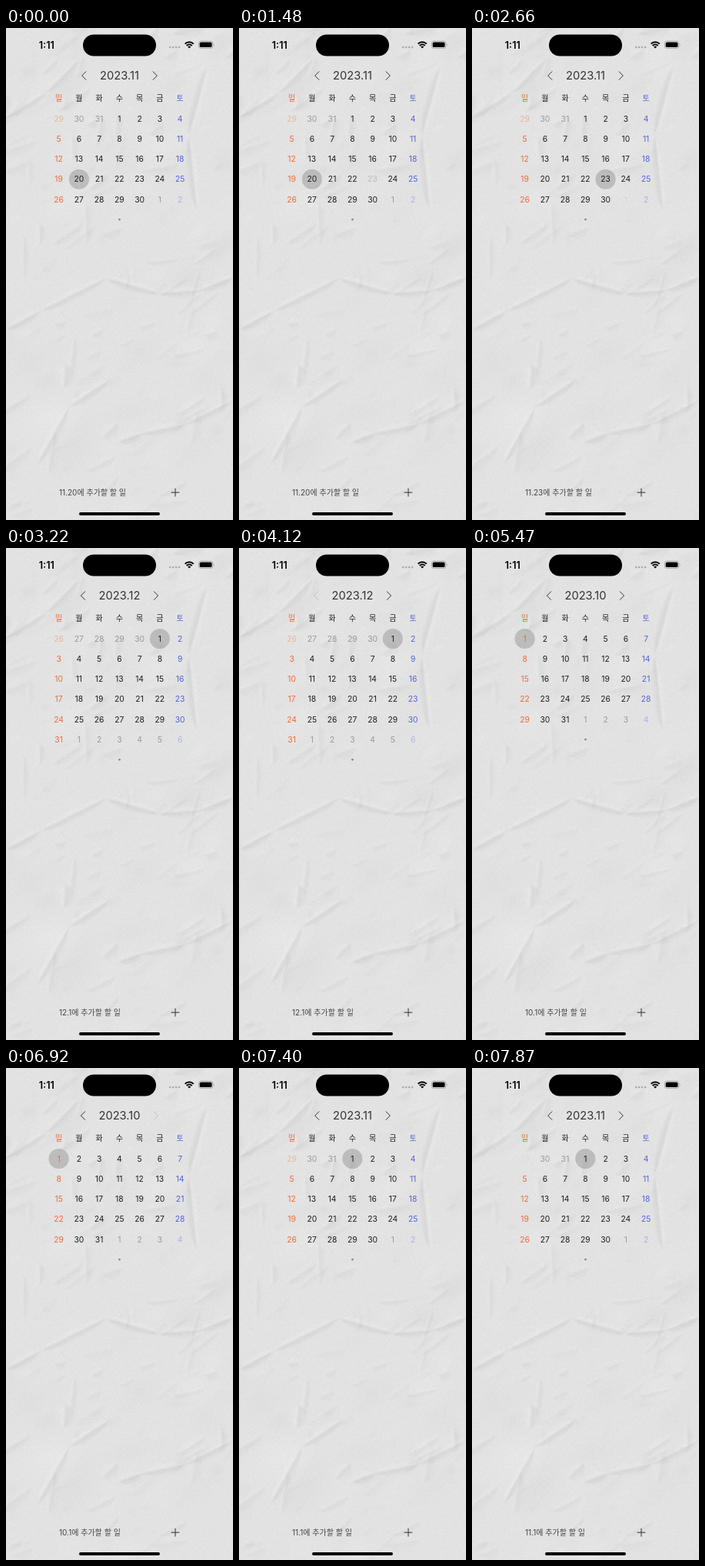
An HTML page with a canvas that plays this animation: 295 by 640 pixels, repeating every 8 s.

```html
<!DOCTYPE html>
<html lang="ko">
<head>
<meta charset="utf-8">
<style>
html, body { margin: 0; width: 100%; height: 100%; overflow: hidden; background: #e2e2e2; }
canvas, svg { position: absolute; left: 0; top: 0; width: 295px; height: 640px; }
text { font-family: Inter, "Noto Sans CJK KR", "Noto Sans CJK", sans-serif; }
.line { fill: none; stroke: #333; stroke-width: 1; stroke-linecap: round; stroke-linejoin: round; }
</style>
</head>
<body>
<canvas id="paper" width="295" height="640"></canvas>
<svg viewBox="0 0 295 640">
  <text x="42.8" y="26.5" font-size="12.6" font-weight="600">1:11</text>
  <rect x="100" y="8.5" width="95" height="28" rx="14"/>
  <g id="signal" fill="#aaa"></g>
  <g fill="none" stroke="#000" stroke-width="2">
    <path d="M232.6 20.6a8 8 0 0 1 11.2 0M234.7 23a5 5 0 0 1 7 0"/>
    <path d="M238.2 26.6l-2-2.1a2.9 2.9 0 0 1 4 0z" fill="#000" stroke="none"/>
  </g>
  <rect x="250.4" y="17.2" width="18.4" height="9.2" rx="2.8" fill="none" stroke="#999" stroke-width=".8"/>
  <rect x="251.7" y="18.5" width="15.8" height="6.6" rx="1.7"/>
  <path d="M270 20.3q1.4 1.5 0 3z" fill="#999"/>
  <g id="view"></g>
  <path class="line" d="M215 604.2h10M220 599.2v10"/>
  <rect x="95" y="630" width="105" height="4" rx="2"/>
</svg>
<script>
const W = 295, H = 640, LOOP = 8000;
const STEP = 26.25, LEFT = 68.6, TOP = 118, MID = 147.5;
const ORANGE = '#ec6a35', BLUE = '#5063d2', INK = '#1c1c1c';

// start time, month, chosen day, pressed cell or arrow
const steps = [
  [0, 11, 20], [1480, 11, 20, 25], [1970, 11, 23], [2660, 11, 23, 33],
  [3220, 12, 1], [4120, 12, 1, 'prev'], [4630, 11, 1], [4980, 11, 1, 'prev'],
  [5470, 10, 1], [6920, 10, 1, 'next'], [7400, 11, 1], [7870, 11, 1, 0]
];

const byId = id => document.getElementById(id);
const tint = col => col === 0 ? ORANGE : col === 6 ? BLUE : INK;
const dot = (x, y, r, fill, alpha = 1) =>
  `<circle cx="${x}" cy="${y}" r="${r}" fill="${fill}" opacity="${alpha}"/>`;
const label = (s, x, y, size, fill, alpha = 1) =>
  `<text x="${x}" y="${y + size * 0.364}" font-size="${size}" fill="${fill}" opacity="${alpha}" text-anchor="middle">${s}</text>`;
const arrow = (x, dir, pressed) =>
  `<path class="line" opacity="${pressed ? 0.2 : 1}" d="M${x - dir * 2.6} 56.7l${dir * 5.2} 5.3l${-dir * 5.2} 5.3"/>`;

function draw([, month, day, pressed]) {
  const first = new Date(2023, month - 1, 1).getDay();
  const days = new Date(2023, month, 0).getDate();
  const rows = Math.ceil((first + days) / 7);
  const spread = month === 11 ? 46.2 : 47.5;
  let out = label('2023.' + month, MID, 62, 14.7, '#333');
  out += arrow(MID - spread, -1, pressed === 'prev') + arrow(MID + spread, 1, pressed === 'next');
  [...'일월화수목금토'].forEach((s, c) => out += label(s, LEFT + c * STEP, 91.8, 10, tint(c)));
  for (let i = 0; i < rows * 7; i++) {
    const n = i - first + 1, col = i % 7;
    const x = LEFT + col * STEP, y = TOP + Math.floor(i / 7) * STEP;
    const inside = n > 0 && n <= days;
    const alpha = (inside ? 1 : 0.37) * (pressed === i ? 0.2 : 1);
    if (n === day) out += dot(x, y, 13.1, '#000', 0.17);
    out += label(new Date(2023, month - 1, n).getDate(), x, y, 10.3, tint(col), alpha);
  }
  out += dot(MID, TOP + rows * STEP - 0.2, 1.4, '#888');
  out += `<text x="69" y="607.7" font-size="10" fill="#444">${month}.${day}에 추가할 할 일</text>`;
  byId('view').innerHTML = out;
}

let seed = 41;
function rnd(a = 0, b = 1) {
  seed = (seed * 16807) % 2147483647;
  return a + (b - a) * seed / 2147483647;
}

const g = byId('paper').getContext('2d', { willReadFrequently: true });

// white shows less than black on light grey, so it is weighted up
function fade(gradient, a) {
  const ink = a > 0 ? '255,255,255' : '0,0,0';
  gradient.addColorStop(0, `rgba(${ink},${a > 0 ? a * 5 : -a})`);
  gradient.addColorStop(1, `rgba(${ink},0)`);
  return gradient;
}

function patch(x, y, rx, ry, turn, a) {
  g.save();
  g.translate(x, y);
  g.rotate(turn);
  g.scale(rx, ry);
  g.fillStyle = fade(g.createRadialGradient(0, 0, 0, 0, 0, 1), a);
  g.fillRect(-1, -1, 2, 2);
  g.restore();
}

function slope(x, y, u, v, w, a) {
  const len = Math.hypot(u - x, v - y);
  const nx = (y - v) / len * w, ny = (u - x) / len * w;
  const mx = (x + u) / 2, my = (y + v) / 2;
  g.fillStyle = fade(g.createLinearGradient(mx, my, mx + nx, my + ny), a);
  g.beginPath();
  g.moveTo(x, y);
  g.lineTo(u, v);
  g.quadraticCurveTo(mx + nx * 2, my + ny * 2, x, y);
  g.fill();
}

// shade on one side of the fold, light on the other
function fold(x, y, u, v, w, a) {
  slope(x, y, u, v, w, -a);
  slope(x, y, u, v, -w, a * 0.7);
}

const creases = [
  [[0, 116], [52, 84], [96, 40]],
  [[262, 50], [238, 140], [248, 236]],
  [[0, 392], [44, 368], [130, 325], [200, 345], [252, 341], [295, 324]],
  [[146, 538], [176, 527], [234, 515], [295, 484]],
  [[40, 568], [82, 492], [134, 458]]
];

function paintPaper() {
  g.fillStyle = '#e2e2e2';
  g.fillRect(0, 0, W, H);
  for (let i = 0; i < 130; i++) {
    const r = 10 + 50 * rnd() ** 2;
    patch(rnd(0, W), rnd(0, H), r, r * rnd(0.4, 0.8), rnd(-0.9, -0.2), rnd(-0.026, 0.026));
  }
  g.filter = 'blur(0.8px)';
  for (let i = 0; i < 110; i++) {
    const x = rnd(-20, W), y = rnd(0, H), len = rnd(12, 60);
    const turn = rnd() < 0.7 ? rnd(-0.8, -0.1) : rnd(-1.7, -1.2);
    fold(x, y, x + len * Math.cos(turn), y + len * Math.sin(turn), rnd(5, 15), rnd(0.01, 0.04));
  }
  for (const pts of creases)
    pts.slice(1).forEach(([u, v], i) => fold(...pts[i], u, v, 9, 0.06));
  g.filter = 'none';
  // fine paper fibre
  const img = g.getImageData(0, 0, W, H), d = img.data;
  for (let i = 0; i < d.length; i += 4) {
    const n = rnd(-3.5, 3.5);
    for (let c = 0; c < 3; c++) d[i + c] += n;
  }
  g.putImageData(img, 0, 0);
}

let shown = null;
const start = performance.now();
function tick() {
  const t = (performance.now() - start) % LOOP;
  const step = steps.filter(s => s[0] <= t).pop();
  if (step !== shown) draw(shown = step);
  requestAnimationFrame(tick);
}
for (let i = 0; i < 4; i++) byId('signal').innerHTML += dot(213.2 + i * 4, 25, 1.3, '#aaa');
paintPaper();
tick();
</script>
</body>
</html>
```
